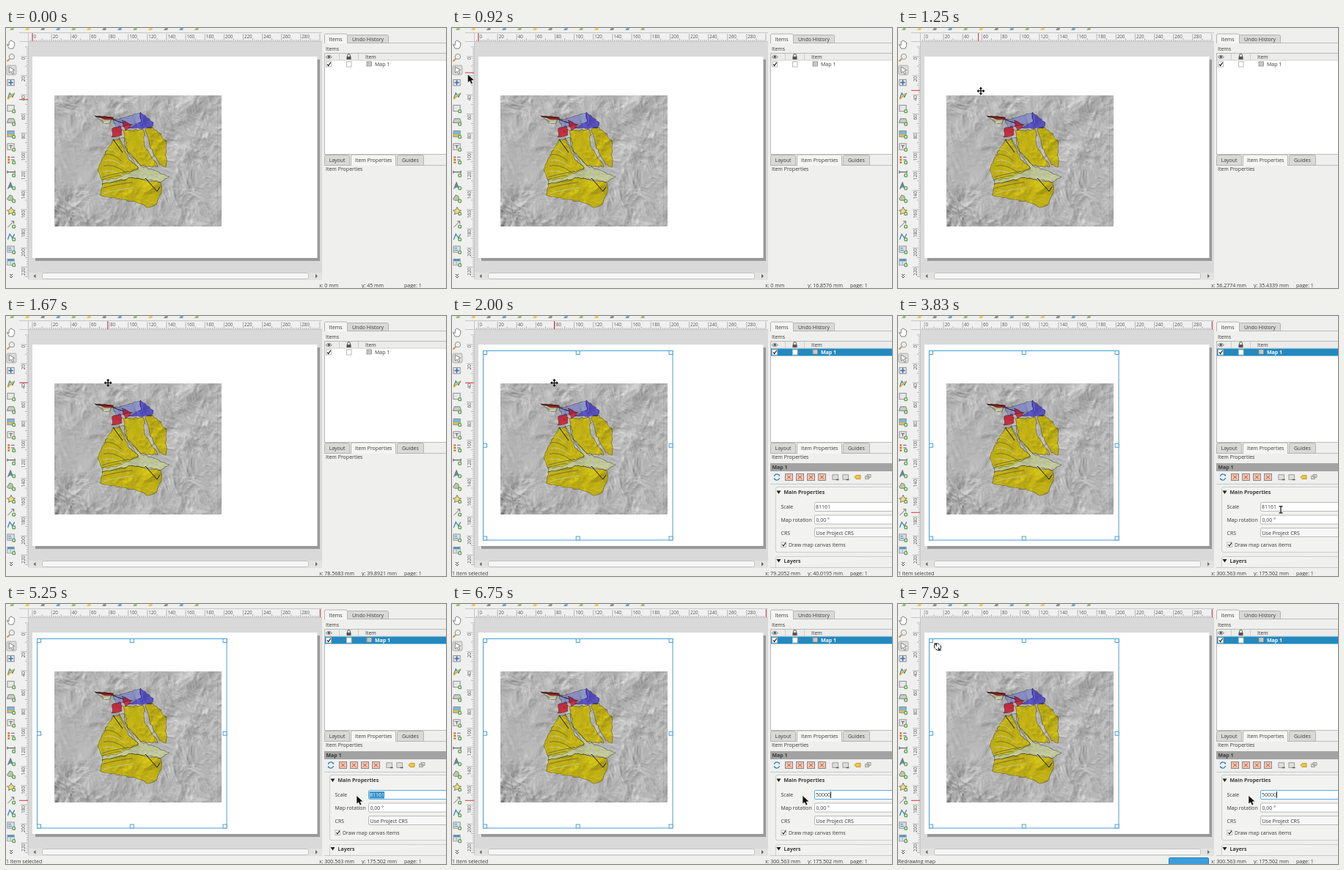
Write an HTML page with a canvas that moves like this. It is 600 by 355 pixels and loops after 8 s.

```html
<!DOCTYPE html>
<html lang="en">
<head>
<meta charset="utf-8">
<title>Layout map scale</title>
<style>
html, body { margin: 0; width: 100%; height: 100%; overflow: hidden; background: #efefee; }
svg, canvas { position: absolute; left: 0; top: 0; }
canvas { left: 66px; top: 92px; }
text { font: 7px "Open Sans", "Noto Sans", sans-serif; fill: #3a3a3a; white-space: pre; }
.bold { font-weight: 700; }
.tick text { font-size: 6.2px; fill: #555; }
.box { fill: #fff; stroke: #b9b9b9; }
.tab { fill: #d9d9d8; stroke: #b4b4b4; }
.on { fill: #f5f5f4; }
.blue { fill: none; stroke: #4a9fcf; }
</style>
</head>
<body>
<svg width="600" height="355" viewBox="0 0 600 355">
  <rect width="600" height="355" fill="#efefee"/>
  <g id="topbar"></g>
  <!-- canvas -->
  <rect x="18" y="6" width="413" height="338" fill="#f0f0f0"/>
  <rect x="31" y="19" width="400" height="315" fill="#d9d9d9"/>
  <rect x="40" y="43" width="388" height="275" fill="#999"/>
  <rect x="36" y="39" width="388.500" height="275" fill="#fff"/>
  <path d="M18 18.500H431M30.500 7V343M18 6.500H431" stroke="#c6c6c6" fill="none"/>
  <g class="tick" id="rulers"></g>
  <rect x="31" y="334" width="400" height="10" fill="#e2e2e1"/>
  <rect x="49.500" y="334.500" width="363" height="8" rx="2" fill="#f6f6f6" stroke="#c0c0c0"/>
  <path d="M40.500 336l-3 2.700 3 2.700zM422 336l3 2.700-3 2.700z" fill="#666"/>
  <g id="tools"></g>
  <!-- item list -->
  <path d="M434 20.500H600M434 187.500H600" stroke="#bdbdbd"/>
  <path class="tab" d="M465.500 20.500v-9q0-2 2-2h52q2 0 2 2v9z"/>
  <path class="tab on" d="M434.500 21v-11q0-2 2-2h27q2 0 2 2v11"/>
  <text x="440.500" y="18">Items</text><text x="472" y="18">Undo History</text>
  <text x="436" y="31">Items</text>
  <rect class="box" x="434.500" y="34.500" width="170" height="138"/>
  <rect x="435" y="35" width="165" height="9" fill="#ececeb"/>
  <path d="M435 44H600M454.500 35v9M480.500 35v9" stroke="#cfcfcf"/>
  <path d="M436 39.700q4-5 8.500 0q-4.500 4-8.500 0z" fill="#ddd" stroke="#777" stroke-width=".8"/><circle cx="440.300" cy="39.300" r="1.600" fill="#555"/>
  <path d="M465.500 39v-1.500a2 2 0 0 1 4 0V39" fill="none" stroke="#555"/><rect x="464.500" y="39" width="6" height="4" fill="#555"/>
  <text x="490" y="42">Item</text>
  <rect id="row" x="435" y="44.500" width="165" height="10" fill="#2489be"/>
  <rect class="box" x="436.500" y="46" width="7" height="7"/><path d="M438 49.500l1.700 2 3-4.500" fill="none" stroke="#222" stroke-width="1.200"/>
  <rect class="box" x="464.500" y="46" width="6.500" height="7"/>
  <rect x="492" y="46" width="6.500" height="6" fill="#ddd" stroke="#888" stroke-width=".8"/><path d="M493.500 46v6M494 48h4M494 50h4" stroke="#999" stroke-width=".6"/>
  <text id="rowName" x="503" y="51.500">Map 1</text>
  <!-- property tabs -->
  <path class="tab" d="M434.500 187.500v-12q0-2 2-2h30q2 0 2 2v12zM533.500 187.500v-12q0-2 2-2h32q2 0 2 2v12z"/>
  <path class="tab on" d="M470.500 188v-13q0-2 2-2h57q2 0 2 2v13"/>
  <text x="440.500" y="183">Layout</text><text x="476" y="182.500">Item Properties</text><text x="540" y="183">Guides</text>
  <text x="436" y="195">Item Properties</text>
  <g id="props">
    <rect x="434" y="201" width="166" height="11" fill="#a3a3a3"/>
    <text class="bold" x="436.500" y="209">Map 1</text>
    <g id="propTools"></g>
    <path d="M434 229.500H600" stroke="#c9c9c9"/>
    <path d="M604 233.500H444q-2.500 0-2.500 2.500V320q0 2.500 2.500 2.500H604M604 328.500H444q-2.500 0-2.500 2.500V343.500" fill="#f2f2f1" stroke="#cdcdcd"/>
    <path d="M434 343.500H600" stroke="#c9c9c9"/>
    <path d="M442.500 238.500h6l-3 4.500zM442.500 332h6l-3 4.500z" fill="#222"/>
    <text class="bold" x="452.500" y="243">Main Properties</text>
    <text class="bold" x="452.500" y="336.500">Layers</text>
    <text x="448.500" y="263">Scale</text><text x="448.500" y="281">Map rotation</text><text x="448.500" y="298.500">CRS</text>
    <rect id="field" class="box" x="494.500" y="254.500" width="112" height="12" rx="1.500"/>
    <rect class="box" x="494.500" y="272" width="112" height="12" rx="1.500"/>
    <rect class="box" x="494.500" y="289.500" width="112" height="12" rx="1.500" style="fill:#f7f7f7"/>
    <text x="496.500" y="281">0,00 °</text><text x="496.500" y="298.500">Use Project CRS</text>
    <rect id="mark" y="256" height="9.500" fill="#3391c8"/>
    <text x="496" y="263"><tspan id="plain"></tspan><tspan id="picked" style="fill:#fff"></tspan></text>
    <rect id="caret" y="256" width=".9" height="9" fill="#111"/>
    <rect class="box" x="449" y="309" width="6.500" height="6.500"/><path d="M450.500 312l1.500 2 3-4.500" fill="none" stroke="#222" stroke-width="1.200"/>
    <text x="459" y="314.500">Draw map canvas items</text>
  </g>
  <!-- status bar -->
  <text id="status" x="0" y="354"></text>
  <rect id="bar" x="369.500" y="346.500" height="10" rx="1.500" fill="#3b9fdd" stroke="#2e82b8"/>
  <text id="posX" x="427" y="354"></text><text id="posY" x="485" y="354"></text><text x="543" y="354">page: 1</text>
</svg>
<canvas id="map" width="228" height="179"></canvas>
<svg width="600" height="355" viewBox="0 0 600 355">
  <path id="tickX" d="M0 7V18" stroke="#d8343a"/>
  <path id="tickY" d="M18 0H30" stroke="#d8343a"/>
  <g id="frame"><rect class="blue" x="42.500" y="47.500" width="258.500" height="258.500"/></g>
  <g id="spin" transform="translate(54 58.500)" fill="none" stroke="#111" stroke-width="1.100">
    <path d="M-3.500 2.200A4 4 0 0 1 2.500-3.200M3.500-2.200A4 4 0 0 1-2.500 3.200"/>
    <path d="M-5 -4.500H-1.500V-1M5 4.500H1.500V1"/>
  </g>
  <g id="cursor">
    <path id="arrow" d="M0 0V11.500L2.800 9.300 4.600 13.300 6.900 12.300 5.200 8.500 9 8.200Z" fill="#111" stroke="#fff" stroke-width=".6"/>
    <path id="cross" d="M-4 0H4M0-4V4M-1.500-3L0-4.500 1.500-3M-1.500 3L0 4.500 1.500 3M-3-1.500L-4.500 0-3 1.500M3-1.500L4.500 0 3 1.500" fill="none" stroke="#111" stroke-width="1.300"/>
    <path id="beam" d="M-2.500-4.500H2.500M0-4.500V4.500M-2.500 4.500H2.500" fill="none" stroke="#111" stroke-width="1.200"/>
  </g>
</svg>
<script>
const $ = id => document.getElementById(id);
const add = (id, markup) => $(id).insertAdjacentHTML('beforeend', markup);
const show = (id, on) => { $(id).style.display = on ? '' : 'none'; };
const MM = 1.3065;
const toX = mm => 36 + mm * MM, toY = mm => 39 + mm * MM;

function drawRulers() {
  let d = '', labels = '';
  for (let mm = -10; mm <= 300; mm += 2) {
    const x = toX(mm), y = toY(mm);
    const len = mm % 20 === 0 ? 10 : mm % 10 === 0 ? 4 : 2;
    if (x > 31 && x < 430) d += `M${x} 18v${-len}`;
    if (y > 19 && y < 342) d += `M30 ${y}h${-len}`;
    if (mm % 20 || mm < 0) continue;
    if (x < 415) labels += `<text x="${x + 1.5}" y="13.5">${mm}</text>`;
    if (y < 335) labels += `<text text-anchor="end" transform="translate(25.5 ${y + 1}) rotate(-90)">${mm}</text>`;
  }
  add('rulers', `<path d="${d}" stroke="#8a8a8a" stroke-width=".6"/>${labels}`);
}

function drawTools() {
  const sheet = (fill, mark = '') => `<rect x="-5.500" y="-5" width="10" height="9" fill="${fill}" stroke="#888"/>${mark}`;
  const stroke = (color, d, w = 1) => `<path d="${d}" fill="none" stroke="${color}" stroke-width="${w}"/>`;
  const shape = (color, d) => `<path d="${d}" fill="${color}" stroke="#777"/>`;
  const plus = '<circle cx="4" cy="4" r="2.800" fill="#5aa04a"/>' + stroke('#fff', 'M2.300 4H5.700M4 2.300V5.700');
  const nodes = stroke('#3c7fbd', 'M-5 4L-2-4 2 2 5-4', 1.4);
  const plain = [
    shape('#fff', 'M-3 6L-6 0-3 1V-4L0-6 5-3V2L3 6Z'),
    '<circle cx="1" cy="-1" r="4" fill="#eee" stroke="#888"/>' + stroke('#c99a2e', 'M-2 2L-6 6', 2),
    '<rect x="-6.500" y="-7" width="14" height="14" rx="2" fill="#dcdcdc" stroke="#aaa"/>' + shape('#fff', 'M-3-5L5 0 2 1 4 5 2 6 0 2-3 4Z'),
    sheet('#dfe8f2', stroke('#3f6d9c', 'M-.5-4V3M-4-.5H3', 1.8)),
    nodes + stroke('#e2b400', 'M-5 5L3-3', 2)
  ];
  const adders = [
    sheet('#e8e8e6'),
    shape('#ccc', 'M-6 2L-4-4H4L6 2Z'),
    sheet('#7db7dd', stroke('#e5be37', 'M-5 2H4', 3)),
    sheet('#e8e8e6', stroke('#555', 'M-3-2H2M-.5-2V2')),
    stroke('#d5692c', 'M-5-4H-2M-5 0H-2M-5 4H-2', 2.5) + stroke('#555', 'M0-4H5M0 0H5'),
    stroke('#666', 'M-6-1H6M-5.500-3V1M5.500-3V1', 1.3),
    shape('#4c8ac2', 'M-5 5L-1-5 3 5-1 2Z'),
    shape('#b4cf9d', 'M-6 1L-2-5 2-3 3 3H-4Z'),
    shape('#f2dc78', 'M0-6L2-2 6-1 3 1 4 5 0 3-4 5-3 1-6-1-2-2Z'),
    stroke('#666', 'M-5 5L4-4M0-4H4V0'),
    nodes,
    sheet('#d5e4ef', stroke('#45799f', 'M-4-2H0M-4 1H1')),
    sheet('#fff', stroke('#4d90c0', 'M-5-3H4', 3) + stroke('#90a9bb', 'M-5 1H4M-1-4V4'))
  ].map(icon => icon + plus);
  [...plain, ...adders].forEach((icon, i) =>
    add('tools', `<g transform="translate(7 ${22.5 + i * 17.5}) scale(.92)">${icon}</g>`));
  add('tools', stroke('#444', 'M5 336l2 2 2-2M5 339l2 2 2-2'));

  const tints = ['#8fae55', '#e6c03c', '#777', '#568fc0'];
  for (let i = 0; i < 13; i++) {
    const x = 7 + i * 21;
    add('topbar', `<path d="M${x} 0l-2 3h5l1-3z" fill="${tints[i % 4]}" opacity=".8"/>`);
  }

  const refresh = 'M-3.500-1a3.600 3.600 0 0 1 7-.5v-2';
  add('propTools', `<g transform="translate(443 220)">${stroke('#3c83c0', refresh, 1.3)}<g transform="rotate(180)">${stroke('#3c83c0', refresh, 1.3)}</g></g>`);
  for (let i = 0; i < 4; i++) add('propTools', `<g transform="translate(${460 + i * 15} 220.500)">` +
    sheet('#f0c6b4', stroke('#c8472e', 'M-3-3l5 5m0-5l-5 5')) + '</g>');
  for (let i = 0; i < 2; i++) add('propTools', `<g transform="translate(${523 + i * 14} 220.500) scale(.75)">` +
    sheet('#ddd', stroke('#555', 'M1 4h5', 2)) + '</g>');
  add('propTools', '<path d="M549 220l2-2.500h6v5h-6z" fill="#efc83e" stroke="#c09a27"/><path d="M563.500 218.500h5v4h-5zM566 216.500h5v4h-5z" fill="#ddd" stroke="#999"/>');

  const third = [0, 1, 2];
  third.forEach(i => third.forEach(j => {
    if (i === 1 && j === 1) return;
    add('frame', `<rect class="blue" x="${42.5 + i * 126.75}" y="${47.5 + j * 126.75}" width="5" height="5" style="fill:#fff"/>`);
  }));
}

const hash = (x, y) => { const s = Math.sin(x * 127.1 + y * 311.7) * 43758.5453; return s - Math.floor(s); };
const fade = v => v * v * (3 - 2 * v);
const mix = (a, b, p) => a + (b - a) * p;

function noise(x, y) {
  const i = Math.floor(x), j = Math.floor(y), u = fade(x - i), v = fade(y - j);
  return mix(mix(hash(i, j), hash(i + 1, j), u), mix(hash(i, j + 1), hash(i + 1, j + 1), u), v);
}

// Ridged, warped terrain height
function height(x, y) {
  const wx = x + 16 * noise(x / 24, y / 24), wy = y + 16 * noise(x / 24 + 9, y / 24);
  const u = (wx + wy) * .5, v = (wx - wy) * .85;
  let h = 0;
  for (let o = 0; o < 5; o++) {
    const f = 2 ** o / 30;
    h += .5 * .53 ** o * (1 - Math.abs(2 * noise(u * f + o * 17, v * f + 50) - 1));
  }
  return h;
}

// Polygon whose edges wander by a seeded amount
function rough(points) {
  const pts = points.split(' ').map(p => p.split(',').map(Number)), path = new Path2D();
  pts.forEach(([x, y], i) => {
    const [u, v] = pts[(i + 1) % pts.length], n = Math.ceil(Math.hypot(u - x, v - y) / 4);
    for (let s = 0; s < n; s++) {
      const px = mix(x, u, s / n), py = mix(y, v, s / n), w = s ? 2.4 : 0;
      path.lineTo(px + w * (hash(px, py) - .5), py + w * (hash(py, px) - .5));
    }
  });
  path.closePath();
  return path;
}

function drawMap() {
  const { width: W, height: H } = $('map'), ctx = $('map').getContext('2d');
  const img = ctx.createImageData(W, H);
  for (let y = 0; y < H; y++) for (let x = 0; x < W; x++) {
    const corner = Math.max(0, 1 - (x + H - y) / 85);
    const plain = Math.exp(-((x - 30) ** 2 + (y - 85) ** 2) / 1600);
    const slope = height(x + 1, y + 1) - height(x - 1, y - 1);
    const g = 180 + slope * 270 * (.8 + corner - .5 * plain) - corner * 22 - (x === 222 ? 12 : 0);
    img.data.set([g, g, g, 255], (y * W + x) * 4);
  }
  ctx.putImageData(img, 0, 0);
  ctx.translate(-66, -92);

  const area = (color, points) => {
    const p = rough(points);
    ctx.globalCompositeOperation = 'source-over';
    ctx.fillStyle = 'rgba(255,255,255,.17)';
    ctx.fill(p);
    ctx.globalCompositeOperation = 'multiply';
    ctx.fillStyle = color;
    ctx.fill(p);
    ctx.lineWidth = .5;
    ctx.strokeStyle = '#666';
    ctx.stroke(p);
  };
  const YELLOW = '#fde81c', GREEN = '#f6ffc4';
  area(YELLOW, '145,154 154,151 168,180 181,191 150,206 131,208 125,194 132,177');
  area(YELLOW, '131,213 172,204 211,211 212,225 206,239 194,245 178,238 128,228');
  area(YELLOW, '160,140 188,139 189,160 207,190 184,188 165,168');
  area(YELLOW, '190,138 200,135 218,154 218,190 209,186 196,160');
  area(GREEN, '154,150 160,149 166,170 184,188 223,203 212,210 172,204 131,213 131,208 180,192');
  area(GREEN, '125,123 146,124 142,130 133,130');
  area('#ff3d52', '121,120 146,122 147,125 135,125');
  area('#ff3d52', '145,137 157,134 158,146 144,149');
  area('#b4bcff', '146,126 183,116 184,129 150,136');
  area('#ff3d52', '158,126 172,132 163,140');
  area('#7268ff', '183,115 201,129 198,137 167,137 184,128');

  // Gullies run from the valley out to the west rim
  ctx.lineWidth = 1;
  for (let i = 0; i < 9; i++) {
    const y = 166 + i * 7.5, lift = i < 5 ? 8 : -8;
    ctx.globalCompositeOperation = 'source-over';
    ctx.strokeStyle = i % 2 ? '#77702a' : '#c3c68c';
    ctx.stroke(new Path2D(`M${131 + 4 * hash(i, 3)} ${y}Q145 ${y - 4} ${155 + i * 2.5} ${y + lift}`));
  }
  ctx.strokeStyle = '#151515';
  ctx.stroke(new Path2D('M146 152L159 170M190 205L206 223 210 217M122 121L146 123M146 125L160 130'));
}

// Pointer stops in page millimetres: step, x, y, ease-out power; twelve steps a second
const stops = [[0, -36, 45], [6, -25, 15], [10.6, -25, 15], [15, 56.2774, 35.4339], [21, 79.2052, 40.0195, 2], [34.6, 79.2052, 40.0195],
  [39, 206.35, 129.646], [42, 300.563, 175.502], [44, 343, 174], [47, 380, 172], [49, 369, 172], [51.6, 369, 172], [55, 339, 171], [58, 338.3, 170.3]];
const LEAVE = 42, LAG = .35;

function pointer(k) {
  const i = stops.findIndex(s => s[0] > k);
  if (i < 0) return stops[stops.length - 1].slice(1);
  const [a, x, y] = stops[i - 1], [b, u, v, power = 1] = stops[i];
  const p = 1 - (1 - (k - a) / (b - a)) ** power;
  return [mix(x, u, p), mix(y, v, p)];
}

function render(k) {
  const [px, py] = pointer(k + LAG), x = toX(px), y = toY(py);
  const beam = k >= 45 && k < 58;
  const cross = !beam && x > 43 && x < 301 && y > 47 && y < 306;
  $('cursor').setAttribute('transform', `translate(${x} ${y})`);
  show('beam', beam);
  show('cross', cross);
  show('arrow', !beam && !cross);

  // The readout trails the pointer and stops at the canvas edge
  const [rx, my] = pointer(Math.min(k, LEAVE)), mx = Math.max(0, rx);
  $('tickX').setAttribute('transform', `translate(${toX(mx)} 0)`);
  $('tickY').setAttribute('transform', `translate(0 ${toY(my)})`);
  $('posX').textContent = `x: ${+mx.toPrecision(6)} mm`;
  $('posY').textContent = `y: ${+my.toPrecision(6)} mm`;

  const selected = k >= 24, redraw = k >= 94;
  ['row', 'frame', 'props'].forEach(id => show(id, selected));
  $('rowName').setAttribute('class', selected ? 'bold' : '');
  $('rowName').style.fill = selected ? '#fff' : '';
  $('status').textContent = redraw ? 'Redrawing map' : selected ? '1 item selected' : '';
  show('spin', redraw);
  show('bar', redraw);
  $('bar').setAttribute('width', 54);

  const focus = k >= 52, typing = k >= 66;
  const keys = 1 + [66, 71, 74, 81].filter(s => s <= k).length;
  const value = typing ? '50000'.slice(0, keys) : '81161';
  const picked = typing || k < 55 ? 0 : k < 58 ? 1 : 5;
  $('plain').textContent = value.slice(0, value.length - picked);
  $('picked').textContent = value.slice(value.length - picked);
  $('mark').setAttribute('x', 516 - picked * 4.1);
  $('mark').setAttribute('width', picked * 4.1);
  $('field').style.stroke = focus ? '#5aaee0' : '';
  $('caret').setAttribute('x', 496.1 + value.length * 4);
  show('caret', focus && !picked && (k < 90 || redraw));
}

drawRulers();
drawTools();
drawMap();
const start = performance.now();
function loop() {
  const t = (performance.now() - start) % 8000;
  render(Math.min(95, Math.floor((t + 4) * 12 / 1000)));
  requestAnimationFrame(loop);
}
loop();
</script>
</body>
</html>
```
